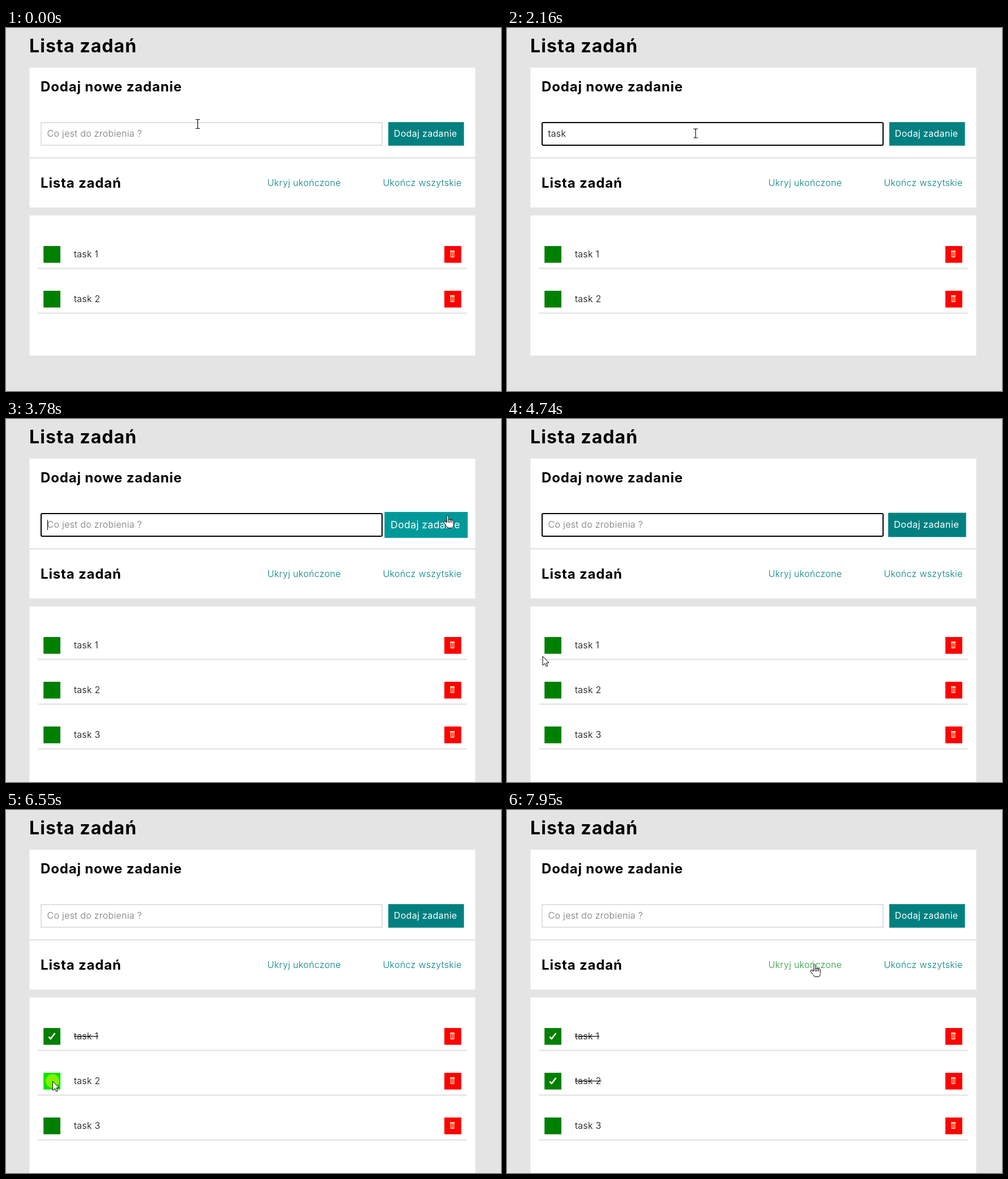
An HTML page with a canvas that plays this animation: 874x641 px, repeating every 8000 ms.

```html
<!DOCTYPE html>
<html lang="pl">
<head>
<meta charset="utf-8">
<title>Lista zadań</title>
<style>
html, body { margin: 0; width: 100%; height: 100%; overflow: hidden; background: #e4e4e4; }
canvas { display: block; }
</style>
</head>
<body>
<canvas id="stage" width="874" height="641"></canvas>
<script>
const ctx = document.getElementById('stage').getContext('2d');
const LOOP = 8000, STEP = 69.17, PRESS = 130;
const TEAL = '#008080', GRAY = '#e0e0e0';
const HOVER = 3560, LEAVE = 4330, ADDED = 3750;

// when the mouse goes down: input, button, first box, second box
const [FOCUS, ADD, ...BOXES] = [290, 3630, 5250, 6500];
const CLICKS = [FOCUS, ADD, ...BOXES];
const WORD = 'task 3', TYPED = [960, 1230, 1360, 1630, 2230, 2560];

// pointer moves: start, end, x, y
const MOVES = [
  [40, 65, 334.5, 174.5], [260, 285, 333, 186],
  [3080, 3420, 838, 212], [3420, 3485, 830, 194], [3485, 3640, 780, 170],
  [4110, 4600, 78, 437], [4600, 4730, 63, 419], [4740, 4860, 62, 402], [4940, 5200, 83, 397],
  [5780, 6250, 83, 485], [6250, 6450, 82.5, 479], [6880, 7390, 508, 348], [7460, 7900, 543, 272]
];

const clamp = v => Math.min(1, Math.max(0, v));
const smooth = v => v * v * (3 - 2 * v);
const easeOut = v => 1 - Math.pow(1 - clamp(v), 2.3);
const pressed = (t, since) => t >= since && t < since + PRESS;

function pointer(t) {
  const q = 4110 + Math.floor((t - 4110) / STEP + 0.001) * STEP;
  let x = 338.5, y = 169.5;
  for (const [from, to, tx, ty] of MOVES) {
    const k = smooth(clamp((q - from) / (to - from)));
    x += (tx - x) * k;
    y += (ty - y) * k;
  }
  return { x, y };
}

function rect(x, y, w, h, color) {
  ctx.fillStyle = color;
  ctx.fillRect(x, y, w, h);
}

function text(s, x, y, size, color, weight = 300) {
  ctx.font = `${weight} ${size}px Inter, "Open Sans", sans-serif`;
  ctx.letterSpacing = size * (weight > 400 ? 0.034 : 0.02) + 'px';
  ctx.fillStyle = color;
  ctx.fillText(s, x, y);
  return ctx.measureText(s).width;
}

function line(points, color, width) {
  ctx.beginPath();
  for (const [x, y] of points) ctx.lineTo(x, y);
  ctx.strokeStyle = color;
  ctx.lineWidth = width;
  ctx.stroke();
}

function at(x, y, draw) {
  ctx.save();
  ctx.translate(x, y);
  draw();
  ctx.restore();
}

function trash() {
  const cream = '#ffe3b0';
  rect(-4, -6, 8, 2.5, cream);
  for (const x of [-3.2, -0.5, 2.2]) rect(x, -4, 1.2, 9, cream);
  rect(-3.2, 4.5, 6.6, 1.5, cream);
}

function check() {
  line([[-5.5, 1], [-2.2, 4.6], [5.5, -5.5]], '#fff', 2.6);
}

function task(i, t) {
  const y = 385 + i * 79, done = t >= BOXES[i] + PRESS;
  rect(66.2, y, 29.8, 29.6, pressed(t, BOXES[i]) ? '#00e600' : '#008000');
  if (done) at(81, y + 14.5, check);
  const w = text('task ' + (i + 1), 120, y + 19.5, 16, '#000');
  if (done) rect(120, y + 14, w, 1.2, '#000');
  rect(774, y, 29.8, 29.6, '#f00');
  at(788, y + 14, trash);
  rect(56.5, y + 38.5, 757.5, 2, GRAY);
}

function squiggle(x, y, w) {
  const wave = Array.from({ length: w }, (_, i) => [x + i, y + Math.sin(i * Math.PI / 2) * 1.1]);
  line(wave, '#d8424a', 0.9);
}

function input(t) {
  const focused = t >= FOCUS && t < BOXES[0];
  ctx.strokeStyle = focused ? '#000' : GRAY;
  ctx.lineWidth = 2;
  ctx.beginPath();
  ctx.roundRect(62, 167, 602, 40, focused ? 2 : 0);
  ctx.stroke();

  const value = t < ADDED ? WORD.slice(0, TYPED.filter(k => t >= k).length) : '';
  const last = Math.max(...[FOCUS, ...TYPED, ADDED].filter(k => t >= k));
  const w = value ? text(value, 72.5, 192, 16, '#000') : 0;
  if (!value) text('Co jest do zrobienia ?', 72.5, 192, 16, '#757575');
  if (value.includes(' ')) squiggle(73, 194, 33);
  if (focused && (t - last) % 1000 < 500) rect(Math.round(73 + w), 178, 1, 18, '#000');
}

function button(t) {
  const hover = t >= HOVER && t < LEAVE;
  const grow = t < LEAVE ? easeOut((t - HOVER) / 200) : 1 - easeOut((t - LEAVE) / 1000);
  at(741.8, 187, () => {
    ctx.scale(1 + 0.1 * grow, 1 + 0.1 * grow);
    rect(-66.8, -20.8, 133.6, 41.6, hover ? '#00999a' : TEAL);
    text('Dodaj zadanie', -57, 5, 16, '#fff', 400);
  });
}

function outlined(width = 1) {
  ctx.fillStyle = '#fff';
  ctx.strokeStyle = '#000';
  ctx.lineWidth = width;
  ctx.fill();
  ctx.stroke();
}

function arrow() {
  ctx.beginPath();
  for (const [x, y] of [[0, 0], [0, 16], [4, 12.7], [6.3, 18], [8.8, 17], [6.5, 11.8], [11, 11.5]]) ctx.lineTo(x, y);
  ctx.closePath();
  outlined();
}

function beam() {
  for (const s of [-1, 1]) line([[-4, 8 * s], [-1, 8 * s], [0, 7 * s], [1, 8 * s], [4, 8 * s]], '#111', 1.2);
  line([[0, -7], [0, 7]], '#111', 1.2);
}

function hand() {
  at(-6, 12, () => {
    ctx.rotate(-0.7);
    ctx.beginPath();
    ctx.roundRect(-1.5, -1, 3.5, 10, 1.7);
    outlined();
  });
  ctx.beginPath();
  ctx.roundRect(-2, 8, 12, 14.5, [1, 3, 4, 4]);
  outlined();
  for (let i = 0; i < 4; i++) {
    ctx.beginPath();
    ctx.roundRect(-1.8 + i * 3, i ? 6.5 + i * 0.7 : 0.5, 3, i ? 6 : 14, 1.5);
    outlined(0.9);
  }
  rect(-3, 13, 12.4, 6, '#fff');
}

function cursor(t) {
  const { x, y } = pointer(t);
  if (CLICKS.some(c => pressed(t, c))) {
    ctx.beginPath();
    ctx.arc(x - 0.5, y - 0.5, 12, 0, Math.PI * 2);
    ctx.fillStyle = 'rgba(255,255,0,0.5)';
    ctx.fill();
  }
  const over = (l, r, top, bottom) => x > l && x < r && y > top && y < bottom;
  const link = over(675, 809, 164, 210) || over(462, 594, 262, 285);
  at(x, y, over(61, 665, 160, 208) ? beam : link ? hand : arrow);
}

function draw(t) {
  rect(0, 0, 874, 641, '#e4e4e4');
  text('Lista zadań', 41, 42.5, 32, '#000', 700);
  rect(41.5, 70, 787, 158, '#fff');
  rect(41.5, 230.5, 787, 86.5, '#fff');
  const count = t >= ADDED ? 3 : 2;
  rect(41.5, 331, 787, 89.5 + 79 * count, '#fff');

  text('Dodaj nowe zadanie', 61, 112, 24, '#000', 700);
  input(t);
  button(t);

  text('Lista zadań', 61, 282, 24, '#000', 700);
  const g = clamp((t - 7710) / 200);
  text('Ukryj ukończone', 461.5, 279, 16, `rgb(${38 * g},${128 + 26 * g},${128 - 68 * g})`);
  text('Ukończ wszytskie', 665.5, 279, 16, TEAL);

  for (let i = 0; i < count; i++) task(i, t);
  cursor(t);
}

const start = performance.now();
function frame() {
  draw((performance.now() - start) % LOOP);
  requestAnimationFrame(frame);
}
frame();
</script>
</body>
</html>
```
